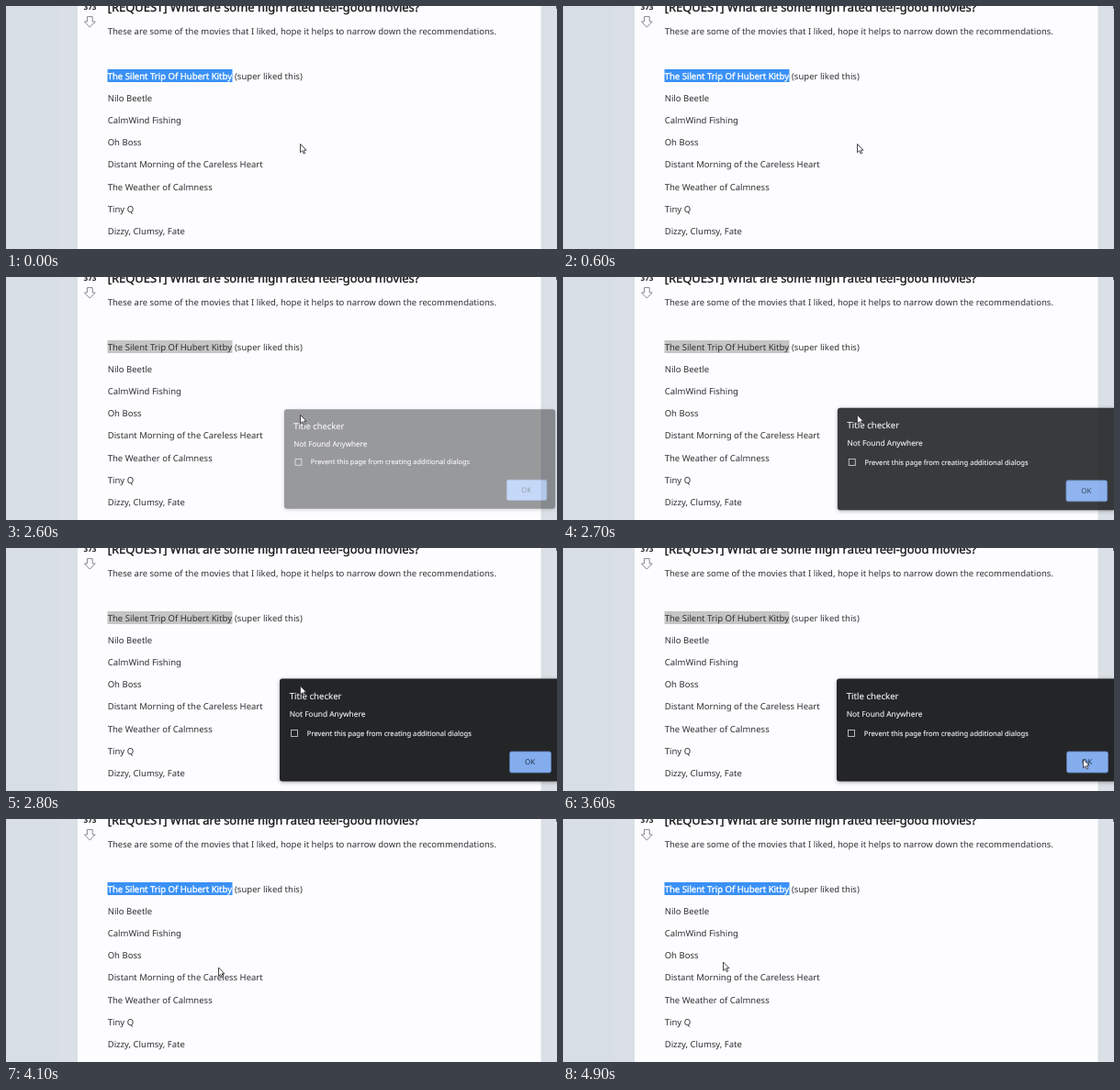
Write an HTML page that moves like this. It is 600x265 px and loops after 5000 ms.

```html
<!DOCTYPE html>
<html lang="en">
<head>
<meta charset="utf-8">
<title>Movie list lookup</title>
<style>
  html, body { margin: 0; width: 100%; height: 100%; overflow: hidden; background: #dae0e6; }
  svg { display: block; width: 600px; height: 265px; }
  text { font: 9.52px "Noto Sans", "Open Sans", sans-serif; fill: #303033; text-rendering: geometricPrecision; }
  #heading { font-size: 12.95px; fill: #1c1c1e; stroke: #1c1c1e; stroke-width: .4px; }
  #votes { font-size: 8.2px; font-weight: 700; fill: #1c1c1e; text-anchor: middle; }
  #list .active { fill: #fff; stroke: #fff; stroke-width: .35px; }
  #dialog { filter: drop-shadow(0 1px 2px #0005); }
  #dialog text { fill: #f0f1f3; stroke: #f0f1f3; stroke-width: .12px; }
  #dialog #ok { font-size: 8px; fill: #22324c; stroke: none; text-anchor: middle; }
</style>
</head>
<body>
<svg viewBox="0 0 600 265">
  <rect width="600" height="265" fill="#dae0e6"/>
  <rect width="56" height="265" fill="#d8dee5"/>
  <rect x="78" width="504.5" height="265" fill="#fdfdff"/>
  <rect x="599" width="1" height="3" fill="#55585c"/>
  <text id="votes" x="91.5" y="4">373</text>
  <path d="M88.4 11.6h5.8v5.4h3l-5.9 6.1-5.9-6.1h3z" fill="#fdfdff" stroke="#85888b" stroke-linejoin="round"/>
  <text id="heading" x="110.7" y="6">[REQUEST] What are some high rated feel-good movies?</text>
  <text x="110.7" y="31">These are some of the movies that I liked, hope it helps to narrow down the recommendations.</text>
  <rect id="mark" x="110.5" y="69" width="136" height="14"/>
  <g id="list"></g>
  <g id="dialog">
    <rect x="298" y="142.5" width="305" height="112" rx="3" fill="#242527"/>
    <text x="308.7" y="165" style="font-size:9.64px">Title checker</text>
    <text x="308.7" y="184.3" style="font-size:8.35px">Not Found Anywhere</text>
    <rect x="310.5" y="198.5" width="7" height="7" fill="none" stroke="#b4b6b9"/>
    <text x="327.8" y="204.6" style="font-size:7.65px">Prevent this page from creating additional dialogs</text>
    <rect x="548.5" y="222" width="45" height="23" rx="2" fill="#84adee" stroke="#5f7fb8" stroke-width=".8"/>
    <text id="ok" x="570.5" y="236.2">OK</text>
  </g>
  <path id="cursor" d="M0 0v9.3l2.2-2 1.5 3.3 1.5-.7-1.5-3.2h2.8z" fill="#fff" stroke="#36363a" stroke-width=".9" stroke-linejoin="round"/>
</svg>
<script>
const $ = id => document.getElementById(id);
const LOOP = 5000, STEP = 100;

const titles = [
  "The Silent Trip Of Hubert Kitby", "Nilo Beetle", "CalmWind Fishing", "Oh Boss",
  "Distant Morning of the Careless Heart", "The Weather of Calmness", "Tiny Q", "Dizzy, Clumsy, Fate"
];

function addText(x, y, words) {
  const el = document.createElementNS("http://www.w3.org/2000/svg", "text");
  el.setAttribute("x", x);
  el.setAttribute("y", y);
  el.textContent = words;
  return $("list").appendChild(el);
}

const rows = titles.map((title, i) => addText(110.7, 79.5 + i * 24.2, title));
addText(249, 79.5, "(super liked this)");

// Key poses: [time, value, value...]
const fade = [[2500, 0], [2600, .46], [2700, .9], [2800, 1], [3600, 1], [3700, .4], [3800, 0]];
const path = [
  [0, 320.5, 150.5], [2800, 320.5, 150.5], [3000, 382, 173], [3500, 565, 230], [3600, 566.5, 230.5],
  [3700, 566.5, 230.5], [3900, 440, 204], [4100, 231.5, 162], [4200, 200, 162], [4300, 183, 156],
  [4600, 183, 156], [4900, 174.5, 156]
];

function at(keys, t) {
  const i = keys.findIndex(k => k[0] > t);
  if (i < 0) return keys[keys.length - 1].slice(1);
  if (i === 0) return keys[0].slice(1);
  const a = keys[i - 1], b = keys[i], p = (t - a[0]) / (b[0] - a[0]);
  return a.slice(1).map((v, n) => v + (b[n + 1] - v) * p);
}

function draw(now) {
  const t = Math.floor(now % LOOP / STEP) * STEP;
  const active = t < 2500 || t >= 3800;
  $("mark").setAttribute("fill", active ? "#3a91f6" : "#c5c5c6");
  rows[0].classList.toggle("active", active);

  const [shown] = at(fade, t);
  const scale = t < 3000 ? .94 + .06 * shown : 1;
  $("dialog").style.opacity = shown;
  $("dialog").setAttribute("transform", `translate(450 198.7) scale(${scale}) translate(-450 -198.7)`);

  $("cursor").setAttribute("transform", `translate(${at(path, t)})`);
}

const start = performance.now();
function tick() {
  draw(performance.now() - start);
  requestAnimationFrame(tick);
}
tick();
</script>
</body>
</html>
```
